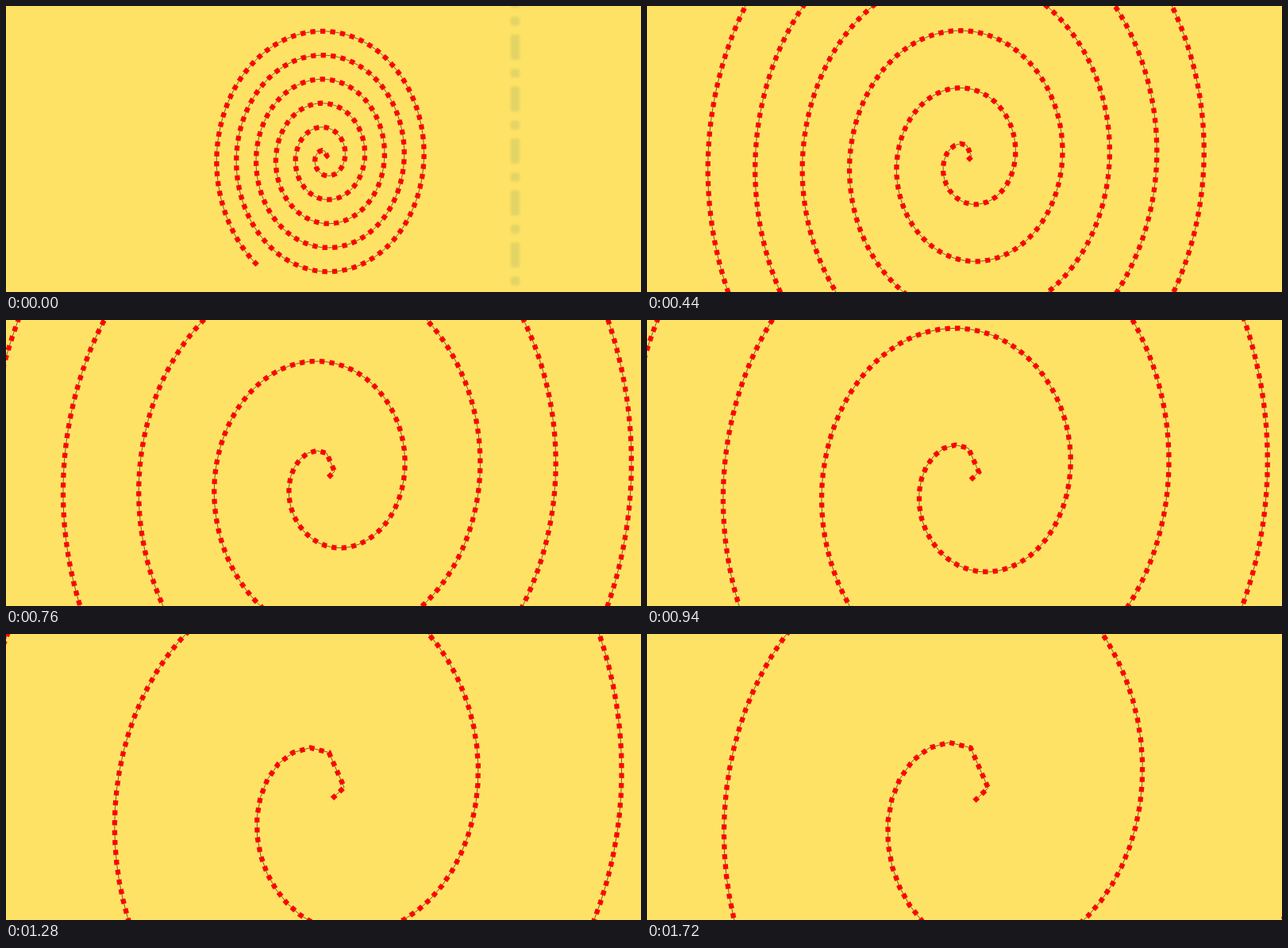
Recreate the animation shown at these times as an HTML page with a canvas. Size 800 px wide and 361 px high, loop 1740 ms.

```html
<!DOCTYPE html>
<html lang="en">
<head>
<meta charset="utf-8">
<title>Spiral zoom</title>
<style>
html, body { margin: 0; width: 100%; height: 100%; overflow: hidden; background: #fde265; }
canvas { display: block; }
</style>
</head>
<body>
<canvas width="800" height="361"></canvas>
<script>
const ctx = document.querySelector('canvas').getContext('2d');
const LOOP = 1740, STEP = 20;
const ORIGIN = [400.8, 188.5];

// Zoom over time: [ms, pixels per radian of the spiral]
const KEYS = [[20, 3.958], [220, 6.21], [440, 9.47], [760, 15.18],
              [1120, 24.85], [1460, 32.15], [1720, 33.3]]
  .map(([t, z]) => [t, Math.log(z)]);
const slopes = KEYS.slice(1).map(([t, v], i) => (v - KEYS[i][1]) / (t - KEYS[i][0]));
const tangents = KEYS.map((_, i) => {
  if (i === 0) return slopes[0];
  if (i === slopes.length) return 0;
  const a = slopes[i - 1], b = slopes[i];
  return 2 * a * b / (a + b);
});

// Monotone cubic through the logarithms of the zoom
function zoomAt(t) {
  t = Math.min(Math.max(t, KEYS[0][0]), KEYS.at(-1)[0]);
  let i = 0;
  while (i < slopes.length - 1 && t > KEYS[i + 1][0]) i++;
  const [t0, v0] = KEYS[i], [t1, v1] = KEYS[i + 1];
  const h = t1 - t0, u = (t - t0) / h, w = 1 - u;
  return Math.exp(v0 * (1 + 2 * u) * w * w + v1 * u * u * (3 - 2 * u) +
                  h * u * w * (tangents[i] * w - tangents[i + 1] * u));
}

// Archimedean spiral with evenly spaced points
const CHORD = 0.658, END = 35.48, STRETCH = 1.22, DASH = 6.265;
const spiral = [[0, 0]];
for (let a = CHORD; ; a += CHORD / a) {
  const angle = Math.min(a, END);
  spiral.push([angle * Math.cos(angle), -angle * Math.sin(angle) * STRETCH]);
  if (a >= END) break;
}

function drawSpiral(zoom) {
  const cx = ORIGIN[0] + 0.351 * zoom, cy = ORIGIN[1] + 0.667 * zoom;
  ctx.beginPath();
  for (const [x, y] of spiral) ctx.lineTo(cx + x * zoom, cy + y * zoom);
  ctx.setLineDash([]);
  ctx.lineWidth = 0.8;
  ctx.strokeStyle = '#4a4310';
  ctx.stroke();
  ctx.setLineDash([DASH, DASH]);
  ctx.lineWidth = DASH;
  ctx.strokeStyle = '#f00';
  ctx.stroke();
}

// Soft column of long and short marks on the right
function drawMarks(zoom) {
  const x = ORIGIN[0] + 60.8 * zoom;
  if (x > 840) return;
  const period = 16.57, width = 2.8 * zoom;
  ctx.save();
  ctx.filter = `blur(${0.4 * zoom}px)`;
  ctx.fillStyle = 'rgba(100, 140, 110, 0.17)';
  ctx.beginPath();
  for (let i = -7; i <= 7; i++) {
    const height = (i % 2 ? 2.7 : 8) * zoom;
    const y = ORIGIN[1] + (i * period / 2 - 1.36) * zoom;
    ctx.roundRect(x - width / 2, y - height / 2, width, height, 0.6 * zoom);
  }
  ctx.fill();
  ctx.restore();
}

function draw(now) {
  const zoom = zoomAt(Math.floor(now % LOOP / STEP) * STEP);
  ctx.fillStyle = '#fde265';
  ctx.fillRect(0, 0, 800, 361);
  drawMarks(zoom);
  drawSpiral(zoom);
}

const start = performance.now();
function tick() {
  draw(performance.now() - start);
  requestAnimationFrame(tick);
}
tick();
</script>
</body>
</html>
```
